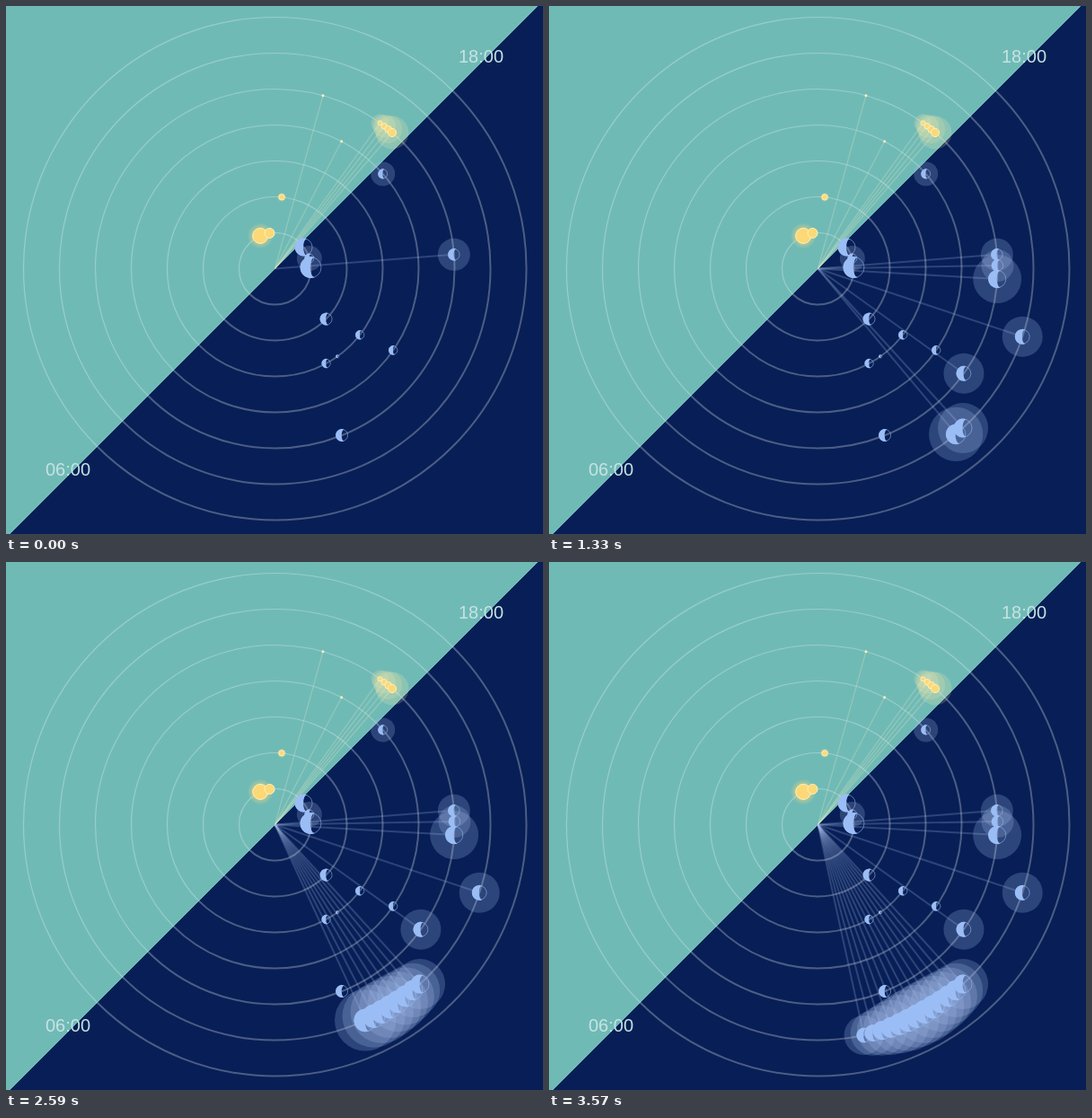
Write an HTML page that moves like this. It is 598 px wide and 588 px high and loops after 3.64 s.

```html
<!DOCTYPE html>
<html lang="en">
<head>
<meta charset="utf-8">
<title>Day and night dial</title>
<style>
  html, body { margin: 0; width: 100%; height: 100%; overflow: hidden; background: #071f56; }
  svg { display: block; width: 598px; height: 588px; }
  text { font: 20px "Liberation Sans", Arial, sans-serif; text-anchor: middle; fill: #c6e3e2; }
  .ring { fill: none; stroke: #fff; }
  .day .ring { stroke-opacity: .28; stroke-width: 1.2; }
  .night .ring { stroke-opacity: .28; stroke-width: 2; }
  .ray { stroke: #a9c0ee; stroke-opacity: .23; stroke-width: 2; }
  .sunray { stroke: #f3ecc0; stroke-opacity: .27; stroke-width: 1.2; }
  .halo { fill: #a3bde8; fill-opacity: .24; }
  .lit { fill: #9bbdf6; }
  .rim { fill: none; stroke: #9bbdf6; stroke-opacity: .55; stroke-width: 1; }
  .sunhalo { fill: #fbe9a8; fill-opacity: .2; }
  .sun { fill: #fcd976; stroke: #fff0bd; stroke-width: 1; }
  .dot { fill: #fbf0bd; }
</style>
</head>
<body>
<svg viewBox="0 0 598 588">
  <defs>
    <clipPath id="dayClip"><path d="M0 0H592L4 588H0Z"/></clipPath>
    <clipPath id="nightClip"><path d="M592 0H598V588H4Z"/></clipPath>
    <radialGradient id="glow">
      <stop offset=".45" stop-color="#fcd976" stop-opacity=".6"/>
      <stop offset="1" stop-color="#fcd976" stop-opacity="0"/>
    </radialGradient>
  </defs>
  <path d="M0 0H598V588H0Z" fill="#071f56"/>
  <path d="M0 0H592L4 588H0Z" fill="#70bab6" shape-rendering="crispEdges"/>
  <g class="day" clip-path="url(#dayClip)"></g>
  <g class="night" clip-path="url(#nightClip)"></g>
  <g id="suns"></g>
  <g id="halos"></g>
  <g id="moons"></g>
  <text x="529" y="63">18:00</text>
  <text x="69" y="523">06:00</text>
</svg>
<script>
const CX = 299.5, CY = 292.5, LOOP = 3640, FRAME = 70;
const find = s => document.querySelector(s);
const suns = find("#suns"), halos = find("#halos"), moons = find("#moons");

function add(parent, tag, attrs) {
  const el = document.createElementNS("http://www.w3.org/2000/svg", tag);
  for (const key in attrs) el.setAttribute(key, attrs[key]);
  return parent.appendChild(el);
}
const circle = (parent, cls, cx, cy, r) => add(parent, "circle", { class: cls, cx, cy, r });
const ray = (parent, cls, x2, y2) => add(parent, "line", { class: cls, x1: CX, y1: CY, x2, y2 });

// angles run clockwise from three o'clock
function polar(ring, deg) {
  const a = deg * Math.PI / 180;
  return [CX + ring * Math.cos(a), CY + ring * Math.sin(a)];
}

function moon(ring, deg, r) {
  const [x, y] = polar(ring, deg), g = add(moons, "g", {});
  const tip = x + r * .35, h = r * .937;
  circle(g, "rim", x, y, r - .5);
  add(g, "path", {
    class: "lit",
    d: `M${tip} ${y - h}A${r} ${r} 0 1 0 ${tip} ${y + h}A${r * .4} ${h} 0 0 1 ${tip} ${y - h}Z`
  });
  return g;
}

function sun(ring, deg, r, glow) {
  const [x, y] = polar(ring, deg);
  if (glow) circle(suns, "", x, y, r * 1.7).setAttribute("fill", "url(#glow)");
  circle(suns, "sun", x, y, r);
}

for (let r = 40; r <= 280; r += 40) {
  circle(find(".day"), "ring", CX, CY, r);
  circle(find(".night"), "ring", CX, CY, r);
}

// day side: two lone sparks, a fan of four suns, three near the centre
for (const [ring, deg] of [[200, -74.5], [160, -62.4]]) {
  const [x, y] = polar(ring, deg);
  ray(suns, "sunray", x, y);
  circle(suns, "dot", x, y, 1.5);
}
const fan = [0, 1, 2, 3].map(i => ({ deg: -54.2 + 1.65 * i, r: 2.5 + .7 * i }));
for (const { deg, r } of fan) {
  const [x, y] = polar(200, deg);
  ray(suns, "sunray", x, y);
  circle(suns, "sunhalo", x, y, r * 4);
}
for (const { deg, r } of fan) sun(200, deg, r);
sun(40, -114, 8.5, true);
sun(40, -98.5, 5.5);
sun(80, -84.6, 3.2, true);

// night side, always shown
circle(halos, "halo", ...polar(40, -16.6), 14);
circle(halos, "halo", ...polar(160, -41.3), 13.5);
moon(40, -36.7, 10);
moon(40, -16.6, 5.5);
moon(40, -2, 12);
for (let ring = 80; ring <= 160; ring += 40) moon(ring, 24.7 + 1584 / ring, ring > 80 ? 5.2 : 7);
moon(120, 54.5, 2);
moon(120, 61.6, 5.2);
moon(200, 68.1, 7);
moon(160, -41.3, 5.5);

// moons that arrive one by one, the last ones 2.5 degrees apart
const spots = [[200, -4.5, 18], [200, -1, 18], [200, 3.3, 27], [240, 18.4, 22.5], [200, 35.7, 22.5]];
for (let i = 0; i < 13; i++) {
  spots.push([240, 47.7 + 2.5 * i, 28 - i / 2 + 10 * Math.sin(Math.PI * i / 12)]);
}

const arrivals = spots.map(([ring, deg, size], k) => {
  const [x, y] = polar(ring, deg), back = add(halos, "g", {});
  ray(back, "ray", x, y);
  circle(back, "halo", x, y, size);
  return { parts: [back, moon(ring, deg, size * .375)], start: (3 * k - 1) * FRAME };
});

function draw(now) {
  const t = now % LOOP;
  for (const { parts, start } of arrivals) {
    for (const part of parts) part.style.display = t >= start ? "" : "none";
  }
  requestAnimationFrame(draw);
}
draw(performance.now());
</script>
</body>
</html>
```
